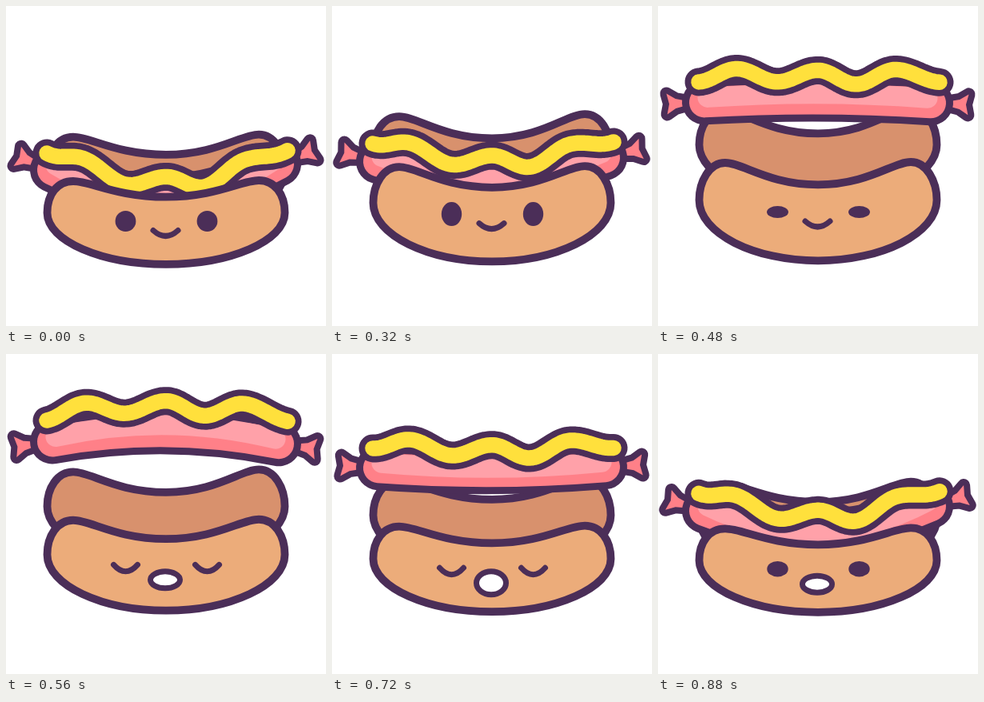
Write an HTML page with a canvas that moves like this. It is 400 px wide and 400 px high and loops after 960 ms.

```html
<!DOCTYPE html>
<html lang="en">
<head>
<meta charset="utf-8">
<title>Jumping hot dog</title>
<style>
  html, body { margin: 0; width: 100%; height: 100%; overflow: hidden; background: #fff; }
  canvas { display: block; width: 400px; height: 400px; }
</style>
</head>
<body>
<canvas id="stage" width="400" height="400"></canvas>
<script>
const ctx = document.getElementById('stage').getContext('2d');
const INK = '#4b2e58', BUN = '#ecac7a', BACK = '#d8916d';
const PINK = '#ff8088', LIGHT = '#ffa1a9', YELLOW = '#ffe03c';
const STEP = 80, STEPS = 12;

const smooth = u => (1 - Math.cos(Math.PI * u)) / 2;
const easeOut = u => Math.sin(Math.PI / 2 * u);
const easeIn = u => 1 - Math.cos(Math.PI / 2 * u);

// Each key: [step, value, easing towards it]
const HEIGHT = [[0, 184], [2, 195], [4, 172], [7, 83, easeOut], [12, 184]];
const BEND = [[0, 41], [2, 39], [4, 26], [7, -15], [9, 6], [12, 41]];
const BUN_TOP = [[0, 219], [2, 227], [5.5, 194, easeOut], [8, 215], [12, 219]];
const EYE = [[0, 13], [4, 15], [7, 0, easeIn], [9, 0], [12, 13]];
const WAVE = [[51, 0], [97, -14], [150, 4], [200, -10], [247, 7], [298, -13], [352, 0]];

function follow(keys, x) {
  const i = Math.max(1, keys.findIndex(k => k[0] >= x));
  const [xa, ya] = keys[i - 1], [xb, yb, ease = smooth] = keys[i];
  return ya + (yb - ya) * ease((x - xa) / (xb - xa));
}

function stroke(color, width) {
  ctx.strokeStyle = color;
  ctx.lineWidth = width;
  ctx.stroke();
}

function fill(color) {
  ctx.fillStyle = color;
  ctx.fill();
}

function bun(top, dip, bottom, tilt, color) {
  const right = top - tilt;
  const side = top + (bottom - top) * 0.38;
  const low = side + (bottom - side) * 0.55;
  ctx.beginPath();
  ctx.moveTo(51.5, side);
  ctx.bezierCurveTo(51.5, side - 23, 64, top, 84, top);
  ctx.bezierCurveTo(106, top, 138, dip, 200, dip);
  ctx.bezierCurveTo(262, dip, 294, right, 316, right);
  ctx.bezierCurveTo(336, right, 348.5, side - 23, 348.5, side);
  ctx.bezierCurveTo(348.5, low, 280, bottom, 200, bottom);
  ctx.bezierCurveTo(120, bottom, 51.5, low, 51.5, side);
  ctx.closePath();
  fill(color);
  stroke(INK, 9.8);
}

function tail(x, y, dir, angle) {
  ctx.save();
  ctx.translate(x, y);
  ctx.scale(dir, 1);
  ctx.rotate(angle);
  ctx.beginPath();
  for (const [px, py] of [[27, -4], [36, -6], [47, -13], [44, 0], [47, 13], [36, 6], [27, 4]]) ctx.lineTo(px, py);
  ctx.closePath();
  stroke(INK, 16);
  fill(PINK);
  ctx.restore();
}

function sausage(left, sag) {
  const x0 = 58, x1 = 341, right = left - sag * 0.2;
  const angle = -Math.atan(3 * sag / (x1 - x0));
  tail(x0, left, -1, angle);
  tail(x1, right, 1, angle);
  const body = (inset, lift, curve) => {
    ctx.beginPath();
    ctx.moveTo(x0 + inset, left - lift);
    ctx.quadraticCurveTo(200, (left + right) / 2 + 2 * curve - lift, x1 - inset, right - lift);
  };
  body(0, 0, sag);
  stroke(INK, 56);
  stroke(PINK, 38);
  body(4, 6, sag * 1.2);
  stroke(LIGHT, 25);
}

function mustard(left, sag) {
  const x0 = 51, span = 301;
  ctx.beginPath();
  for (let i = 0; i <= 100; i++) {
    const u = i / 100, x = x0 + span * u;
    ctx.lineTo(x, left - sag * 0.08 * u + sag * 4 * u * (1 - u) + follow(WAVE, x));
  }
  stroke(INK, 35);
  stroke(YELLOW, 19.5);
}

function arc(x, y, half, depth) {
  ctx.beginPath();
  ctx.moveTo(x - half, y);
  ctx.quadraticCurveTo(x, y + depth * 2, x + half, y);
  stroke(INK, 7);
}

function oval(x, y, rx, ry, color) {
  ctx.beginPath();
  ctx.ellipse(x, y, rx, ry, 0, 0, 2 * Math.PI);
  fill(color);
}

function face(y, eye, mouth) {
  for (const x of [149.5, 251.5]) {
    if (eye > 1) oval(x, y, 14.2 - eye * 0.1, eye, INK);
    else arc(x, y, 15, 8.5);
  }
  if (mouth) {
    oval(199, y + 19, 18.5, mouth, '#fff');
    stroke(INK, 7);
  } else arc(199.5, y + 11.5, 15.5, 7);
}

function draw(step) {
  const top = follow(BUN_TOP, step), squash = 227 - top;
  const height = follow(HEIGHT, step), bend = follow(BEND, step);
  const backTop = 175 - squash * 1.43;
  const mouth = step < 7 ? 0 : 10.5 + 4 * Math.sin(Math.PI * (step - 7) / 4);
  ctx.fillStyle = '#fff';
  ctx.fillRect(0, 0, 400, 400);
  ctx.lineCap = ctx.lineJoin = 'round';
  bun(backTop, 195 - squash * 1.15, backTop + 113, 3, BACK);
  sausage(height + 25 - bend * 0.1, bend * 0.9);
  mustard(height, bend);
  bun(top, top + 17 + squash / 3, Math.min(323, 324.5 - squash * 0.2), 1, BUN);
  face(273 - squash * 0.5, follow(EYE, step), mouth);
}

const start = performance.now();
function tick() {
  draw(Math.floor((performance.now() - start) / STEP) % STEPS);
  requestAnimationFrame(tick);
}
tick();
</script>
</body>
</html>
```
